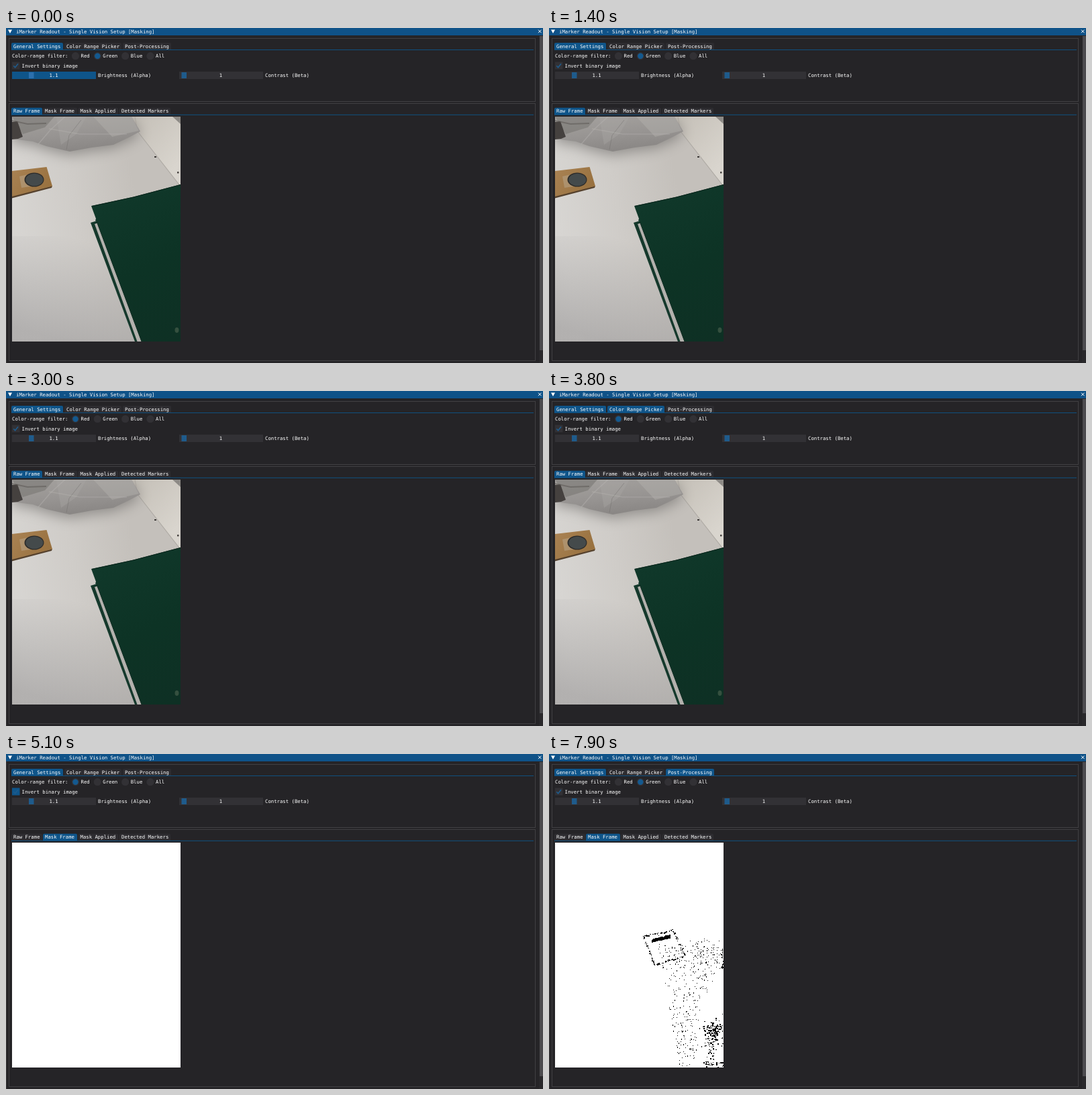
An HTML page with a canvas for the animation above (8 s loop, 800x499 px).

```html
<!DOCTYPE html>
<html lang="en">
<head>
<meta charset="utf-8">
<title>Single Vision Setup</title>
<style>
  html, body { margin: 0; width: 100%; height: 100%; overflow: hidden; background: #252427; }
  canvas { display: block; width: 800px; height: 499px; }
</style>
</head>
<body>
<canvas id="stage" width="800" height="499"></canvas>
<script>
const ctx = document.getElementById('stage').getContext('2d');
const LOOP = 8000;
const BG = '#252427', PANEL = '#323135', ACCENT = '#0f558a', GRAB = '#1f5b8c', BORDER = '#414043';

// Pointer visits: [from, to, widget]
const visits = [
  [0, 400, 'Brightness (Alpha)'], [1600, 2500, 'Red'], [3600, 4000, 'Color Range Picker'],
  [4100, 4700, 'Mask Frame'], [4800, 5000, 'Brightness (Alpha)'], [5100, 5300, 'Invert binary image'],
  [5400, 7200, 'Green'], [7300, 7500, 'Blue'], [7500, 8000, 'Post-Processing']
];
let hovered;

function rect(x, y, w, h, color) {
  ctx.fillStyle = color;
  ctx.fillRect(x, y, w, h);
}

function poly(points, color) {
  ctx.beginPath();
  for (let i = 0; i < points.length; i += 2) ctx.lineTo(points[i], points[i + 1]);
  ctx.closePath();
  ctx.fillStyle = color;
  ctx.fill();
}

function line(points, color, width = 1) {
  ctx.beginPath();
  for (let i = 0; i < points.length; i += 2) ctx.lineTo(points[i], points[i + 1]);
  ctx.strokeStyle = color;
  ctx.lineWidth = width;
  ctx.stroke();
}

function ellipse(x, y, rx, ry, color) {
  ctx.beginPath();
  ctx.ellipse(x, y, rx, ry, 0, 0, Math.PI * 2);
  ctx.fillStyle = color;
  ctx.fill();
}

function gradient(x0, y0, x1, y1, ...colors) {
  const g = ctx.createLinearGradient(x0, y0, x1, y1);
  colors.forEach((c, i) => g.addColorStop(i / (colors.length - 1), c));
  return g;
}

function text(str, x, y, align = 'left') {
  ctx.fillStyle = '#fff';
  ctx.textAlign = align;
  ctx.fillText(str, x, y + 2.5);
}

function frameBox(x, y, w, h) {
  ctx.strokeStyle = BORDER;
  ctx.lineWidth = 1;
  ctx.strokeRect(x + .5, y + .5, w, h);
}

function tabs(y, active, items) {
  for (const [label, x, w] of items) {
    ctx.beginPath();
    ctx.roundRect(x, y - 5, w, 10.5, [2, 2, 0, 0]);
    ctx.fillStyle = label === hovered || label === active ? ACCENT : '#2d2c30';
    ctx.fill();
    text(label, x + 3, y);
  }
  rect(8, y + 5, 778, 1, '#10507f');
}

function radio(label, x, selected) {
  ellipse(x, 41.7, 5.6, 5.6, label === hovered ? ACCENT : PANEL);
  if (label === selected) ellipse(x, 41.7, 4.2, 4.2, label === hovered ? '#21669e' : '#14598f');
  text(label, x + 8, 41.7);
}

function slider(label, x, value, grab) {
  rect(x, 65, 125, 11, label === hovered ? ACCENT : PANEL);
  rect(grab, 66, 7.5, 9, label === hovered ? '#2c70ae' : GRAB);
  text(value, x + 62, 70.5, 'center');
  text(label, x + 128, 70.5);
}

function drawPhoto() {
  rect(9, 132, 251, 335, gradient(9, 260, 190, 230, '#d7d5d2', '#cfccc8', '#c4c0bb'));
  rect(9, 310, 251, 157, gradient(130, 320, 90, 467, '#a09e9e00', '#a09e9eaa'));
  // Side wall of the box
  poly([184, 132, 260, 132, 260, 236, 196, 154], gradient(195, 140, 260, 200, '#c6c1b9', '#d9d5ce'));
  line([196, 154, 260, 236], '#aeaaa4', 1.2);
  line([192, 132, 196, 154], '#b3aea7');
  poly([248, 132, 260, 132, 260, 143], '#8d8a86');
  // Plastic sheet with a soft shadow
  ctx.save();
  ctx.shadowColor = '#65636199';
  ctx.shadowBlur = 20;
  ctx.shadowOffsetY = 5;
  poly([9, 132, 187, 132, 200, 154, 183, 163, 160, 174, 128, 178, 95, 184, 60, 176, 40, 169, 9, 165],
    gradient(90, 132, 95, 186, '#a29f9c', '#979492', '#888583'));
  ctx.restore();
  poly([9, 132, 72, 132, 58, 148, 25, 158], '#75727088');
  poly([75, 132, 120, 132, 105, 158, 82, 174], '#a9a6a366');
  poly([130, 132, 187, 132, 198, 153, 158, 162], '#b3b0ac77');
  line([88, 132, 66, 152, 48, 173], '#b9b6b366', 1.5);
  line([112, 137, 94, 160, 90, 181], '#6b696766');
  line([64, 150, 110, 158, 180, 158], '#b9b6b355', 1.5);
  poly([9, 140, 17, 139, 25, 162, 18, 165, 9, 166], '#45413f');
  line([9, 138, 32, 143, 60, 142], '#5b575488', 2);
  // Cardboard with a lens
  poly([9, 250, 69, 235, 68, 238, 9, 253.5], '#55412d');
  poly([9, 213, 60.5, 207, 69, 235.5, 9, 251], gradient(9, 210, 60, 245, '#a98253', '#98713f'));
  poly([20, 221, 33, 218, 37, 236, 23, 238], '#b8a58b88');
  ellipse(42, 226, 14.5, 10.5, '#2d2c2a');
  ellipse(42.3, 226, 13, 9.2, '#444a4b');
  // Green board and its frame
  poly([126, 290, 136, 287, 203, 467, 192, 467], '#15392c');
  poly([132, 292, 138, 290, 204, 467, 195.5, 467], '#b3b1ad');
  poly([127, 265, 190, 251.5, 260, 233, 260, 467, 202, 467, 135, 288, 133, 287, 134, 284],
    gradient(145, 260, 250, 467, '#10382a', '#0d3325', '#0e3024'));
  line([128, 265.5, 190, 252, 260, 233.5], '#0a241b');
  line([135, 288, 202, 467], '#0b281e');
  ellipse(254.5, 450, 3, 4, '#35503f');
  rect(221, 191, 3, 2, '#3a3735');
  rect(255, 214, 2.5, 2.5, '#4a4643');
}

function buildMask() {
  let seed = 17;
  const rnd = () => (seed = seed * 16807 % 2147483647) / 2147483647;
  const spread = s => (rnd() + rnd() + rnd() - 1.5) * s;
  const path = new Path2D();
  const dot = (x, y, w, h = w) => {
    if (x < 259 && y < 466) path.rect(Math.round(x), Math.round(y), w, h);
  };
  // Ragged marker outline
  const quad = [[140, 271], [184, 262], [202, 300], [157, 314]];
  quad.forEach(([x, y], i) => {
    const [x2, y2] = quad[(i + 1) % 4];
    for (let n = 0; n < 36; n++) {
      const u = rnd();
      dot(x + (x2 - x) * u + spread(1), y + (y2 - y) * u + spread(1), rnd() < .4 ? 2 : 1, 1 + (rnd() < .3));
    }
  });
  // Bar inside the marker
  for (let n = 0; n < 150; n++) {
    const u = rnd();
    dot(153 + 26 * u, 275 - 6 * u + 4 * rnd(), 2);
  }
  // Thinning noise
  for (let n = 0; n < 330; n++) {
    const depth = 172 * rnd() ** 1.6, left = 162 + depth * .18;
    const right = Math.max(222, 268 - depth * .5);
    dot(left + (right - left) * rnd(), 286 + depth + spread(14), 1, 1 + (rnd() < .2));
  }
  for (let n = 0; n < 60; n++) dot(215 + 46 * rnd(), 298 + spread(24), 1, 1 + (rnd() < .2));
  for (let n = 0; n < 20; n++) dot(257 + 3 * rnd(), 288 + 30 * rnd(), 1, 2);
  // Dense corner
  for (let n = 0; n < 120; n++) dot(245 + spread(18), 410 + spread(18), 1 + (rnd() < .6), 1 + (rnd() < .6));
  for (let n = 0; n < 70; n++) dot(241 + spread(8), 440 + spread(34), 1 + (rnd() < .5), 1 + (rnd() < .6));
  for (let n = 0; n < 30; n++) dot(230 + 30 * rnd(), 458 + 9 * rnd(), 1 + (rnd() < .4));
  return path;
}
const mask = buildMask();

function draw(t) {
  hovered = (visits.find(([from, to]) => t >= from && t < to) || [])[2];
  const filter = t >= 2000 && t < 6300 ? 'Red' : 'Green';
  const view = t < 4200 ? 'Raw Frame' : 'Mask Frame';

  ctx.font = '7.3px "DejaVu Sans Mono", monospace';
  rect(0, 0, 800, 499, BG);
  rect(0, 0, 800, 11, '#0f5288');
  poly([3, 2.5, 9, 2.5, 6, 8], '#fff');
  text('iMarker Readout - Single Vision Setup [Masking]', 15, 5.2);
  line([793, 2.7, 797.5, 7.2], '#fff');
  line([797.5, 2.7, 793, 7.2], '#fff');
  rect(794, 11, 6, 488, '#29282b');
  rect(795, 12, 5, 468, '#4c4b4f');
  line([.5, 11, .5, 499], '#39383b');

  frameBox(4, 15, 784, 94);
  tabs(27, 'General Settings', [['General Settings', 8, 77], ['Color Range Picker', 87, 85], ['Post-Processing', 174, 72]]);
  text('Color-range filter:', 9, 41.7);
  radio('Red', 103.5, filter);
  radio('Green', 136.3, filter);
  radio('Blue', 177.7, filter);
  radio('All', 215, filter);
  rect(9, 50.5, 11.5, 11, hovered === 'Invert binary image' ? ACCENT : PANEL);
  line([11.2, 56.3, 13.6, 58.8, 18, 53.2], GRAB, 1.6);
  text('Invert binary image', 23.5, 56);
  slider('Brightness (Alpha)', 9, '1.1', 34);
  slider('Contrast (Beta)', 258, '1', 261.5);

  frameBox(4, 112, 784, 383);
  tabs(123.8, view, [['Raw Frame', 8, 46], ['Mask Frame', 55, 51], ['Mask Applied', 107.5, 59.5], ['Detected Markers', 169, 76]]);

  ctx.save();
  ctx.beginPath();
  ctx.rect(9, 132, 251, 335);
  ctx.clip();
  if (view === 'Raw Frame') {
    drawPhoto();
  } else {
    rect(9, 132, 251, 335, '#fff');
    if (t < 4500 || t >= 6300) {
      ctx.fillStyle = '#000';
      ctx.fill(mask);
    }
  }
  ctx.restore();
}

function tick() {
  draw(performance.now() % LOOP);
  requestAnimationFrame(tick);
}
tick();
</script>
</body>
</html>
```
